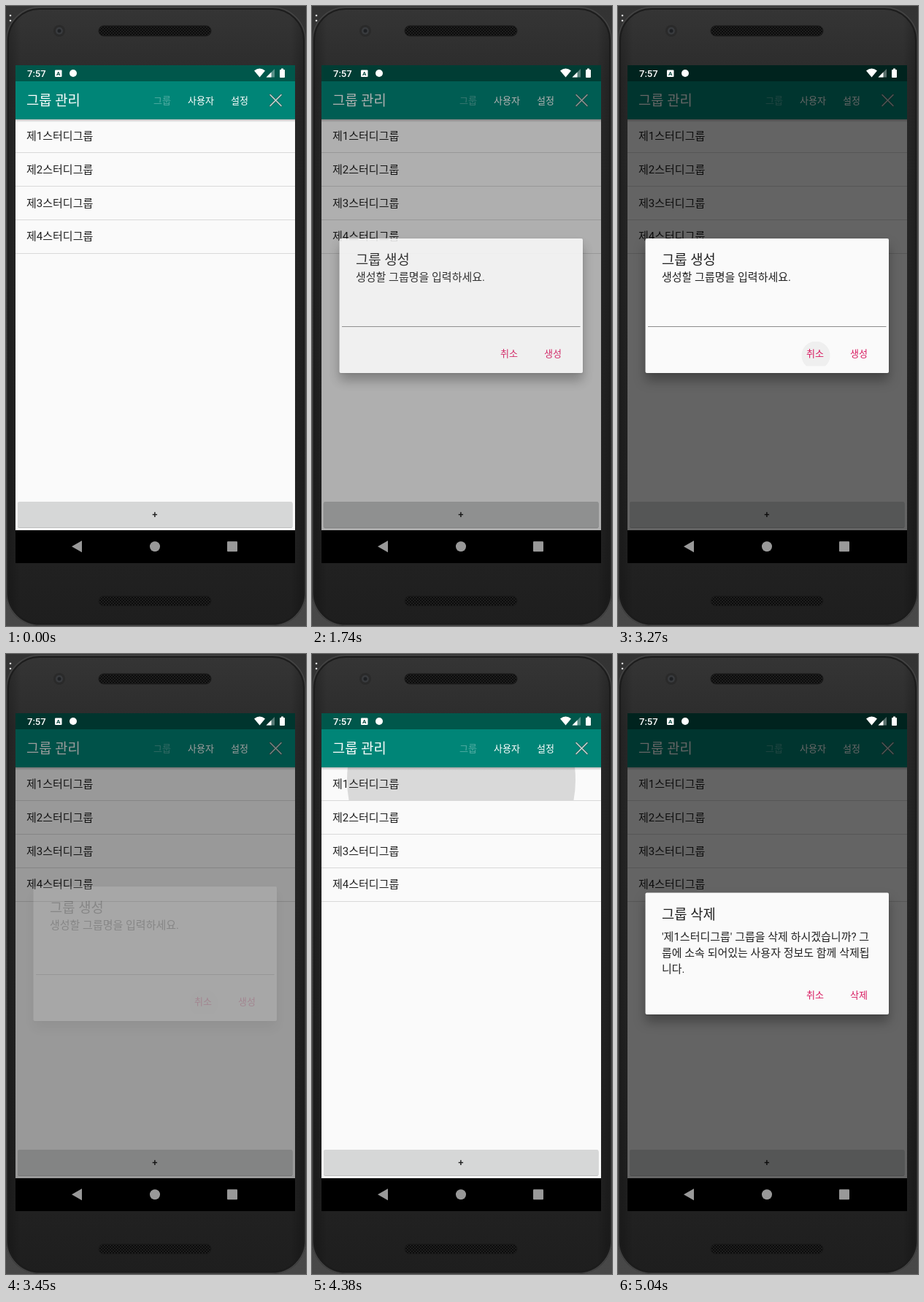
An HTML page that plays this animation: 411 by 848 pixels, repeating every 7020 ms.

```html
<!DOCTYPE html>
<html lang="ko">
<head>
<meta charset="utf-8">
<title>그룹 관리</title>
<style>
  html, body { margin: 0; width: 100%; height: 100%; overflow: hidden; background: #161616; }
  svg { display: block; width: 411px; height: 848px; font-family: Roboto, "Noto Sans CJK KR", "Noto Sans CJK", sans-serif; }
  text { white-space: pre; }
  .title { font-size: 18.75px; font-weight: 500; }
  .body { font-size: 15px; }
  .label { font-size: 13.05px; font-weight: 500; }
  .ink { fill: #212121; }
  .accent { fill: #d81b60; }
  .dialog { filter: drop-shadow(0 10px 8px rgba(0, 0, 0, .28)) drop-shadow(0 1px 1px rgba(0, 0, 0, .15)); }
</style>
</head>
<body>
<svg viewBox="0 0 411 848">
  <defs>
    <linearGradient id="backdrop" x2="0" y2="1">
      <stop offset="0" stop-color="#333"/>
      <stop offset="1" stop-color="#484848"/>
    </linearGradient>
    <linearGradient id="shell" x2="0" y2="1">
      <stop offset="0" stop-color="#353535"/>
      <stop offset=".12" stop-color="#2b2b2b"/>
      <stop offset=".9" stop-color="#212121"/>
      <stop offset="1" stop-color="#1e1e1e"/>
    </linearGradient>
    <linearGradient id="sides">
      <stop offset="0" stop-opacity=".25"/>
      <stop offset=".05" stop-opacity="0"/>
      <stop offset=".95" stop-opacity="0"/>
      <stop offset="1" stop-opacity=".25"/>
    </linearGradient>
    <linearGradient id="barShadow" x2="0" y2="1">
      <stop offset="0" stop-opacity=".24"/>
      <stop offset="1" stop-opacity="0"/>
    </linearGradient>
    <pattern id="mesh" width="4" height="4" patternUnits="userSpaceOnUse">
      <rect width="4" height="4" fill="#1e1e1e"/>
      <circle cx="1" cy="1" r="1" fill="#050505"/>
      <circle cx="3" cy="3" r="1" fill="#050505"/>
    </pattern>
    <clipPath id="addClip"><rect x="16" y="678" width="376.5" height="35" rx="2"/></clipPath>
    <clipPath id="rowClip"><rect x="13" y="155" width="383" height="45"/></clipPath>
    <clipPath id="cancelClip"><rect x="240" y="459" width="60" height="33.5" rx="2"/></clipPath>
  </defs>

  <!-- phone -->
  <rect width="411" height="848" fill="url(#backdrop)"/>
  <g fill="#ddd"><circle cx="6" cy="13" r="1.3"/><circle cx="6" cy="20" r="1.3"/></g>
  <rect y="1" width="411" height="847" rx="46" fill="url(#shell)"/>
  <rect y="1" width="411" height="847" rx="46" fill="url(#sides)"/>
  <rect x=".75" y="1.75" width="409.5" height="845.5" rx="45.5" fill="none" stroke="#444" stroke-width="1.5"/>
  <rect x="3" y="4" width="405" height="841" rx="43" fill="none" stroke="#1c1c1c" stroke-width="2"/>
  <rect x="127" y="27" width="154" height="14" rx="7" fill="url(#mesh)" stroke="#1a1a1a"/>
  <rect x="127" y="807" width="154" height="13.5" rx="6.75" fill="url(#mesh)" stroke="#1a1a1a"/>
  <circle cx="73" cy="34" r="8" fill="#2a2a2a"/>
  <circle cx="73" cy="34" r="5" fill="#393b3e"/>
  <circle cx="73" cy="34" r="2.5" fill="#1e2023"/>

  <!-- app -->
  <rect x="13" y="81" width="383" height="636" fill="#fafafa"/>
  <rect x="13" y="81" width="383" height="22" fill="#00574b"/>
  <g clip-path="url(#rowClip)"><circle id="rowRipple" cx="204.5" cy="172" fill="#d9d9d9"/></g>
  <g id="rows"></g>
  <rect x="13" y="155" width="383" height="4" fill="url(#barShadow)"/>
  <rect x="13" y="103" width="383" height="52" fill="#008577"/>
  <g fill="#fff">
    <text class="title" x="28" y="136">그룹 관리</text>
    <text class="label" x="202" y="133.8" opacity=".32">그룹</text>
    <text class="label" x="249" y="133.8">사용자</text>
    <text class="label" x="308" y="133.8">설정</text>
  </g>
  <g fill="none" stroke-linecap="round">
    <path d="M362 121.5L377 136.5M377 121.5L362 136.5" stroke="#35655f" stroke-width="3.2" opacity=".75"/>
    <path d="M362 121.5L377 136.5M377 121.5L362 136.5" stroke="#cfdad8" stroke-width="1.3"/>
  </g>

  <rect id="addShadow" x="16" y="679" width="376.5" height="35" rx="2" fill="#bdbebe" stroke="#bdbebe" stroke-width="0"/>
  <rect x="16" y="678" width="376.5" height="35" rx="2" fill="#d6d7d7"/>
  <g clip-path="url(#addClip)"><circle id="addRipple" cx="211.5" cy="685" fill="#c4c5c5"/></g>
  <text class="label ink" x="204" y="699.5" text-anchor="middle">+</text>

  <rect id="dim" x="13" y="81" width="383" height="636" opacity="0"/>

  <g id="create" class="dialog" opacity="0">
    <rect x="37.5" y="318" width="333.5" height="184" rx="2" fill="#fafafa"/>
    <text class="title ink" x="60" y="354">그룹 생성</text>
    <text class="body ink" x="60" y="375.5">생성할 그룹명을 입력하세요.</text>
    <path d="M41 438.5H367.5" stroke="#8c8c8c"/>
    <g clip-path="url(#cancelClip)"><circle id="cancelRipple" cx="271" cy="478" r="19.5" fill="#efefef"/></g>
    <text class="label accent" x="258" y="480">취소</text>
    <text class="label accent" x="318" y="480">생성</text>
  </g>

  <g id="remove" class="dialog" opacity="0">
    <rect x="37.5" y="326.5" width="333.5" height="166.5" rx="2" fill="#fafafa"/>
    <text class="title ink" x="60" y="363">그룹 삭제</text>
    <g class="body ink">
      <text x="60" y="391.8">'제1스터디그룹' 그룹을 삭제 하시겠습니까? 그</text>
      <text x="60" y="414">룹에 소속 되어있는 사용자 정보도 함께 삭제됩</text>
      <text x="60" y="436.3">니다.</text>
    </g>
    <text class="label accent" x="258" y="471">취소</text>
    <text class="label accent" x="318" y="471">삭제</text>
  </g>

  <!-- system bars -->
  <g fill="#fff">
    <text class="label" x="29" y="97">7:57</text>
    <rect x="67" y="87.5" width="9.5" height="9.5" rx="1"/>
    <text x="71.75" y="95.3" text-anchor="middle" font-size="8" font-weight="700" fill="#04463d">A</text>
    <circle cx="92" cy="92" r="5"/>
    <path d="M347.5 97.5L340 88.5Q347.5 82.5 355 88.5Z"/>
    <path d="M368 86V97.5H356.5Z" opacity=".35"/>
    <path d="M363.5 90.5V97.5H356.5Z"/>
    <rect x="375" y="87" width="7" height="11" rx="1"/>
    <rect x="377" y="85.5" width="3" height="2"/>
  </g>
  <rect x="13" y="717" width="383" height="45"/>
  <g fill="#999">
    <path d="M90 739.3L104 731.3V747.3Z"/>
    <circle cx="204" cy="739.3" r="7"/>
    <rect x="303" y="732.3" width="14" height="14" rx="1"/>
  </g>
</svg>
<script>
const LOOP = 7020, TICK = 30, ROW = 45.8;
const $ = id => document.getElementById(id);

$('rows').innerHTML = [1, 2, 3, 4].map(n => {
  const y = ROW * (n - 1);
  return `<text class="body ink" x="28" y="${Math.round(183 + y)}">제${n}스터디그룹</text>
    <rect x="13" y="${Math.round(200.3 + y)}" width="383" height="1" fill="#d9d9d9"/>`;
}).join('');

// Each track: [element, attribute, [time, value] keys joined by straight lines]
const tracks = [
  ['addRipple', 'r', [[1229, 0], [1230, 129], [1320, 190], [1350, 215]]],
  ['addRipple', 'opacity', [[1650, 1], [1830, 0]]],
  ['addShadow', 'stroke-width', [[1229, 0], [1230, 1.5], [1650, 1.5], [1800, 0]]],
  ['dim', 'opacity', [
    [1620, 0], [1860, .6],
    [3390, .6], [3420, .52], [3450, .39], [3480, .2], [3510, 0],
    [4860, 0], [5040, .6]]],
  ['create', 'opacity', [
    [1620, 0], [1650, .2], [1680, .48], [1710, .72], [1740, .87], [1770, .96], [1800, 1],
    [3330, 1], [3360, .95], [3390, .76], [3420, .45], [3450, .15], [3480, 0]]],
  ['cancelRipple', 'opacity', [[3269, 0], [3270, 1]]],
  ['rowRipple', 'r', [[4379, 0], [4380, 156.5], [4530, 215]]],
  ['rowRipple', 'opacity', [[4890, 1], [5040, 0]]],
  ['remove', 'opacity', [[4860, 0], [4890, .25], [4920, .58], [4950, .8], [4980, .93], [5010, 1]]],
].map(([id, attr, keys]) => ({ node: $(id), attr, keys }));

function valueAt(keys, t) {
  const i = keys.findIndex(k => k[0] > t);
  if (i === 0) return keys[0][1];
  if (i < 0) return keys[keys.length - 1][1];
  const [t0, a] = keys[i - 1], [t1, b] = keys[i];
  return a + (b - a) * (t - t0) / (t1 - t0);
}

const start = performance.now();
function draw() {
  const elapsed = Math.max(0, performance.now() - start) % LOOP;
  const t = Math.floor(elapsed / TICK) * TICK;
  for (const { node, attr, keys } of tracks) node.setAttribute(attr, valueAt(keys, t));
  requestAnimationFrame(draw);
}
draw();
</script>
</body>
</html>
```
